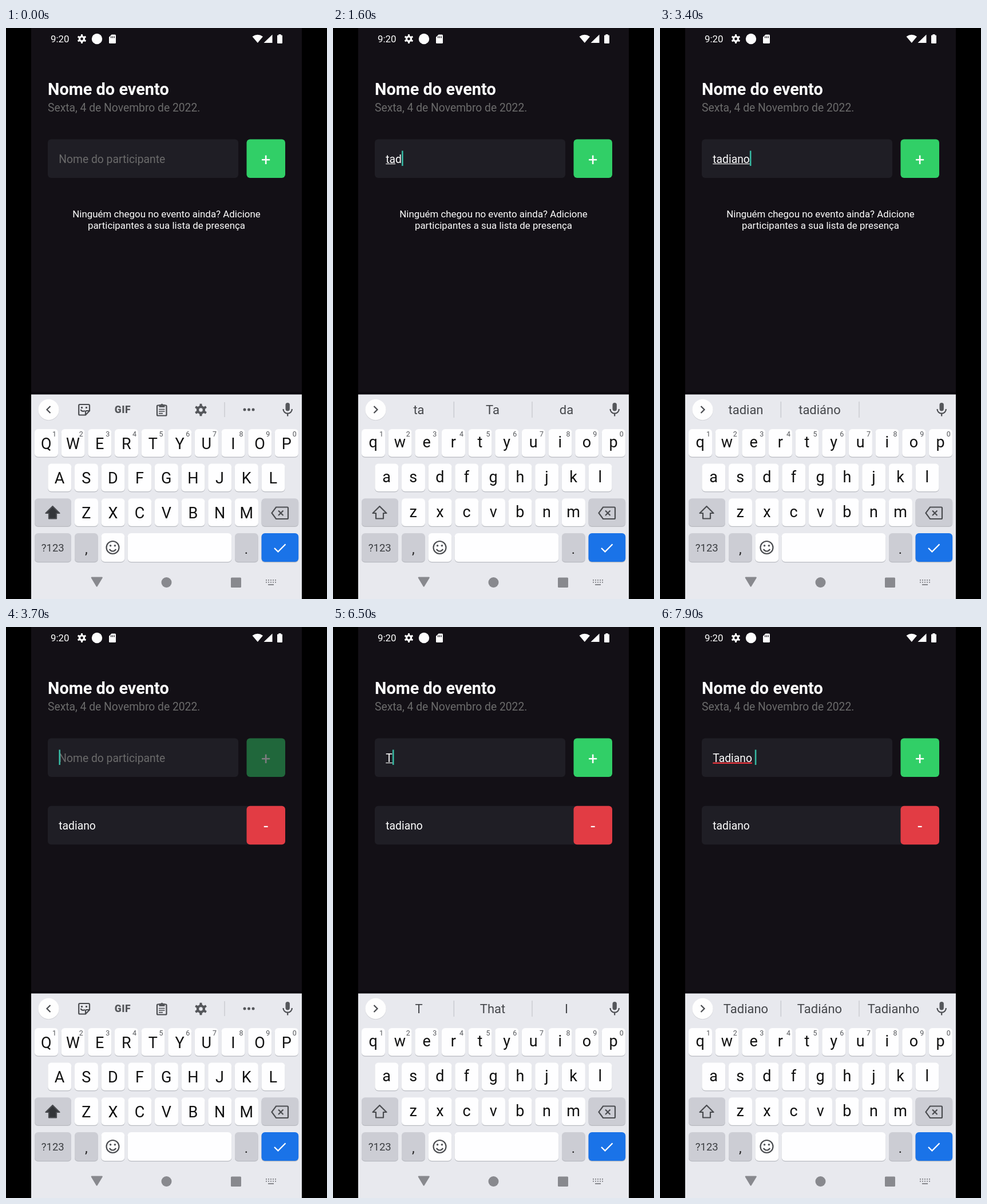
These frames come from a looping animation (561x998 px, 8 s). An HTML page:

```html
<!DOCTYPE html>
<html lang="pt-BR">
<head>
<meta charset="utf-8">
<title>Lista de presença</title>
<style>
html, body { margin: 0; width: 100%; height: 100%; overflow: hidden; background: #000; }
svg { display: block; width: 561px; height: 998px; }
text { font-family: Roboto, sans-serif; white-space: pre; }
.mid text, text.mid { text-anchor: middle; }
.body { font-size: 19.3px; }
.white { fill: #fdfdfd; }
.hint { fill: #6b6b6b; }
.line { fill: none; stroke: #4a4c50; stroke-width: 2.2; }
.icon { fill: #55575b; }
.words { font-size: 22px; fill: #45474b; }
.caps { font-size: 27px; fill: #111; }
.rule { fill: none; stroke: #c3c5ca; stroke-width: 1.2; }
</style>
</head>
<body>
<svg viewBox="0 0 561 998">
  <defs>
    <g id="gear">
      <circle r="5" fill="none" stroke="currentColor" stroke-width="4"/>
      <path id="tooth" d="M-2.2 -6 L-1.7 -10 H1.7 L2.2 -6 Z M-2.2 6 L-1.7 10 H1.7 L2.2 6 Z" fill="currentColor"/>
      <use href="#tooth" transform="rotate(60)"/>
      <use href="#tooth" transform="rotate(120)"/>
    </g>
  </defs>
  <rect width="561" height="998"/>
  <rect x="44" width="473" height="641" fill="#131016"/>

  <!-- status bar -->
  <g class="white">
    <text x="78" y="25" font-size="16.9">9:20</text>
    <use href="#gear" transform="translate(132.5 19) scale(.8)" color="#fdfdfd"/>
    <circle cx="159" cy="19" r="9.2"/>
    <path d="M184.5 11.5 H190.5 Q192 11.5 192 13 V25.5 Q192 27 190.5 27 H181.5 Q180 27 180 25.5 V16 Z"/>
    <path d="M183.6 14.5v3M186.4 14.5v3M189.2 14.5v3" stroke="#131016" stroke-width="1.3"/>
    <path d="M430.5 15 Q439.8 8.5 449 15 L439.8 26 Z"/>
    <path d="M465.5 11.5 V26 H450.5 Z"/>
    <path d="M476.5 11 h4 v1.6 h1.5 q1 0 1 1 V26 q0 1 -1 1 h-7 q-1 0 -1 -1 V13.6 q0 -1 1 -1 h1.5 Z"/>
  </g>

  <text class="white" x="73" y="117" font-size="28.9" font-weight="700">Nome do evento</text>
  <text class="body hint" x="73" y="146">Sexta, 4 de Novembro de 2022.</text>

  <!-- form -->
  <rect x="73" y="194.5" width="333" height="67.5" rx="6" fill="#1f1e25"/>
  <text id="hint" class="body hint" x="92.3" y="235.7">Nome do participante</text>
  <text id="entry" class="body white" x="92.3" y="235.7"></text>
  <rect id="under" x="92.3"/>
  <rect id="caret" y="214.5" width="2.6" height="26.5" fill="#37b8a2"/>
  <g id="add" class="mid white">
    <rect x="420.5" y="194.5" width="67.5" height="67.5" rx="6" fill="#31cf67"/>
    <text x="454.2" y="240" font-size="28.9">+</text>
  </g>

  <g id="empty" class="mid white" font-size="16.9">
    <text x="280.5" y="331">Ninguém chegou no evento ainda? Adicione</text>
    <text x="280.5" y="351">participantes a sua lista de presença</text>
  </g>
  <g id="item" class="white">
    <rect x="73" y="312.7" width="415" height="67.5" rx="6" fill="#1f1e25"/>
    <text class="body" x="92.3" y="354">tadiano</text>
    <rect x="420.5" y="312.7" width="67.5" height="67.5" rx="6" fill="#e23c44"/>
    <text class="mid" x="454.2" y="358" font-size="28.9">-</text>
  </g>

  <!-- keyboard -->
  <rect x="44" y="636" width="473" height="5" fill="#0c0a0f"/>
  <rect x="44" y="640.5" width="473" height="357.5" fill="#e8e9ee"/>
  <circle cx="74.5" cy="667.7" r="18.4" fill="#cfd0d5"/>
  <circle cx="74.5" cy="667" r="18.2" fill="#fefefe"/>
  <path id="chevron" class="line"/>
  <g class="icon">
    <rect x="488.5" y="655" width="7.4" height="14.5" rx="3.7"/>
    <path d="M484.5 666 a7.7 7.7 0 0 0 15.4 0 M492.2 673.5 V678.5" class="line"/>
  </g>

  <g id="tools">
    <path class="line" d="M129 658 H144 Q146 658 146 660 V669 L139 676.5 H129 Q127.200 676.500 127.200 674.700 V660 Q127.200 658 129 658 Z M146 669 H141 Q139 669 139 671 V676.500"/>
    <path class="line" d="M130.500 667 Q133 671.500 138 669"/>
    <path class="icon" d="M131 662 h3 v3 h-3 Z M139 662 h3 v3 h-3 Z"/>
    <text class="icon mid" x="204" y="673" font-size="17.5" font-weight="900" letter-spacing=".5">GIF</text>
    <rect class="line" x="264" y="659.5" width="16.500" height="18" rx="1.5"/>
    <path class="icon" d="M267.500 658 h3 a2.200 2.200 0 0 1 4 0 h3 v5 h-10 Z"/>
    <path class="line" d="M267 666.500 h10.500 M267 670 h10.500 M267 673.700 h7" style="stroke-width:1.7"/>
    <use href="#gear" transform="translate(340.500 667.500) scale(1.08)" color="#55575b"/>
    <path class="rule" d="M382 654 V680"/>
    <g class="icon">
      <circle cx="417" cy="667" r="2.500"/><circle cx="424.500" cy="667" r="2.500"/><circle cx="432" cy="667" r="2.500"/>
    </g>
  </g>
  <g id="words" class="words mid">
    <path class="rule" d="M211.300 653 V681 M348 653 V681"/>
    <text x="150" y="675"></text><text x="279" y="675"></text><text x="408" y="675"></text>
  </g>

  <g id="keys"></g>
  <g id="letters" class="caps mid"></g>
  <g class="mid">
    <path id="shift" d="M81.500 836 L93.500 848 H88 V857.500 H75 V848 H69.500 Z" class="line" stroke-linejoin="round"/>
    <path class="line" d="M472 837.500 H491.500 Q493 837.500 493 839 V856.500 Q493 858 491.500 858 H472 L464.500 847.700 Z M476 843.500 l8.500 8.500 M484.500 843.500 l-8.500 8.500"/>
    <text x="81.800" y="915" font-size="18.500" fill="#3c3e42">?123</text>
    <text x="140.300" y="919" font-size="24" fill="#222">,</text>
    <text x="420" y="919" font-size="24" fill="#222">.</text>
    <circle class="line" cx="186.500" cy="908" r="11"/>
    <circle class="icon" cx="182.600" cy="904.700" r="1.800"/>
    <circle class="icon" cx="190.400" cy="904.700" r="1.800"/>
    <path class="line" d="M180.700 911 Q186.500 918 192.300 911"/>
    <path d="M469 909 l6.500 6.300 L488.500 902.300" fill="none" stroke="#fff" stroke-width="2.300"/>
  </g>

  <!-- navigation bar -->
  <g fill="#88898e">
    <path d="M149.500 959.500 H168 Q169.500 960 168.500 961.500 L159.700 976 Q158.700 977.500 157.700 976 L149 961.500 Q148 960 149.500 959.500 Z"/>
    <circle cx="280.500" cy="969" r="9"/>
    <rect x="393" y="960.500" width="18" height="17.500" rx="1.500"/>
    <path d="M454 965 H472 M454 968.700 H472" stroke="#88898e" stroke-width="2" stroke-dasharray="2 2"/>
    <path d="M458 973 H468" stroke="#88898e" stroke-width="2"/>
  </g>
</svg>
<script>
const NS = 'http://www.w3.org/2000/svg';
const LOOP = 8000, STEP = 100, BLINK = 500;
const $ = id => document.getElementById(id);
const show = (id, on) => { $(id).style.display = on ? '' : 'none'; };
const attrs = (el, set) => { for (const k in set) el.setAttribute(k, set[k]); return el; };
const make = (parent, tag, set) => parent.appendChild(attrs(document.createElementNS(NS, tag), set));

function key(x, y, width, fill = '#fefeff', height = 48.5) {
  make($('keys'), 'rect', { x, y: y + 1.2, width, height, rx: 6, fill: '#b9bbc1' });
  make($('keys'), 'rect', { x, y, width, height, rx: 6, fill });
}

const GREY = '#cccdd4', PITCH = 46.65;
const letters = [];
['QWERTYUIOP', 'ASDFGHJKL', 'ZXCVBNM'].forEach((row, r) => {
  const y = 701 + r * 60.6;
  [...row].forEach((ch, i) => {
    const x = [50, 73.3, 120][r] + i * PITCH;
    key(x, y, 41);
    const el = make($('letters'), 'text', { x: x + 20.3 });
    letters.push({ el, ch, base: y + 34.8 });
    if (!r) {
      const num = make($('keys'), 'text', { x: x + 34.5, y: 713.7, 'font-size': 12.5, fill: '#55575b', 'text-anchor': 'middle' });
      num.textContent = (i + 1) % 10;
    }
  });
});
key(50, 822.2, 64, GREY);
key(446.5, 822.2, 64.7, GREY);
[[50, 64, GREY], [120, 40.7, GREY], [166.5, 40.7], [212.7, 181.5], [400, 40.7, GREY], [446.5, 64.7, '#1a73e8']]
  .forEach(([x, w, fill]) => key(x, 883, w, fill, 50));

// time, field text, suggestions
const edits = [
  [0, '', ''],
  [1200, 't', 't T to'],
  [1400, 'ta', 'ta Ta da'],
  [1600, 'tad', 'tad Tad da'],
  [1800, 'tadi', 'tadi Tadi tidy'],
  [2000, 'tadia', 'tadia Tadia media'],
  [2100, 'tadian', 'tadian Tadian'],
  [2300, 'tadiano', 'tadian tadiáno'],
  [3600, '', ''],
  [6400, 'T', 'T That I'],
  [6600, 'Ta', 'Ta Take Tal'],
  [6800, 'Tad', 'Tad Tada Ted'],
  [7000, 'Tadi', 'Tadi Tadin Tide'],
  [7100, 'Tadia', 'Tadia Tadian Media'],
  [7300, 'Tadian', 'Tadian Tadiana'],
  [7500, 'Tadiano', 'Tadiano Tadiáno Tadianho'],
  [7800, 'Tadiano\u00a0', 'Tadiano Tadiáno Tadianho']
];
const PRESS = 3400, ADDED = 3600;

const at = t => edits.filter(e => e[0] <= Math.max(t, 0)).pop();
const ease = p => p < .5 ? 2 * p * p : 1 - 2 * (1 - p) ** 2;
const ramp = (t, from, length) => ease(Math.min(1, Math.max(0, (t - from) / length)));

function drawKeyboard(words) {
  const typing = words !== '';
  show('tools', !typing);
  show('words', typing);
  $('words').querySelectorAll('text').forEach((el, i) => { el.textContent = words.split(' ')[i] || ''; });
  $('chevron').setAttribute('d', typing ? 'M71.5 661 l6 6 -6 6' : 'M77.5 661 l-6 6 6 6');
  $('shift').style.fill = typing ? 'none' : '#333539';
  for (const { el, ch, base } of letters) {
    el.textContent = typing ? ch.toLowerCase() : ch;
    el.setAttribute('y', typing ? base - 2.5 : base);
  }
}

function draw(t) {
  const [when, text] = at(t);
  const [, marked, words] = at(t - STEP); // keyboard reacts one step late
  const entry = $('entry');
  show('hint', !text);
  show('empty', t < ADDED);
  show('item', t >= ADDED);

  entry.textContent = text && marked ? marked.trim() : '';
  const markWidth = text ? entry.getComputedTextLength() : 0;
  entry.textContent = text;
  const width = text ? entry.getComputedTextLength() : 0;
  const typo = marked.endsWith('\u00a0');
  attrs($('under'), {
    y: typo ? 236.6 : 236.9, width: markWidth,
    height: typo ? 2.4 : 1.2, fill: typo ? '#e0343c' : '#e8e8e8'
  });

  const anchor = when === 0 ? 100 : when === ADDED ? 2300 : when;
  $('caret').setAttribute('x', 92.4 + width);
  show('caret', Math.floor((t - anchor) / BLINK) % 2 === 0);
  $('add').style.opacity = 1 - .8 * (ramp(t, PRESS, 150) - ramp(t, ADDED, 250));
  drawKeyboard(words);
}

let last = -1;
function tick() {
  const t = Math.floor(performance.now() % LOOP / STEP) * STEP;
  if (t !== last) draw(last = t);
  requestAnimationFrame(tick);
}
tick();
</script>
</body>
</html>
```
